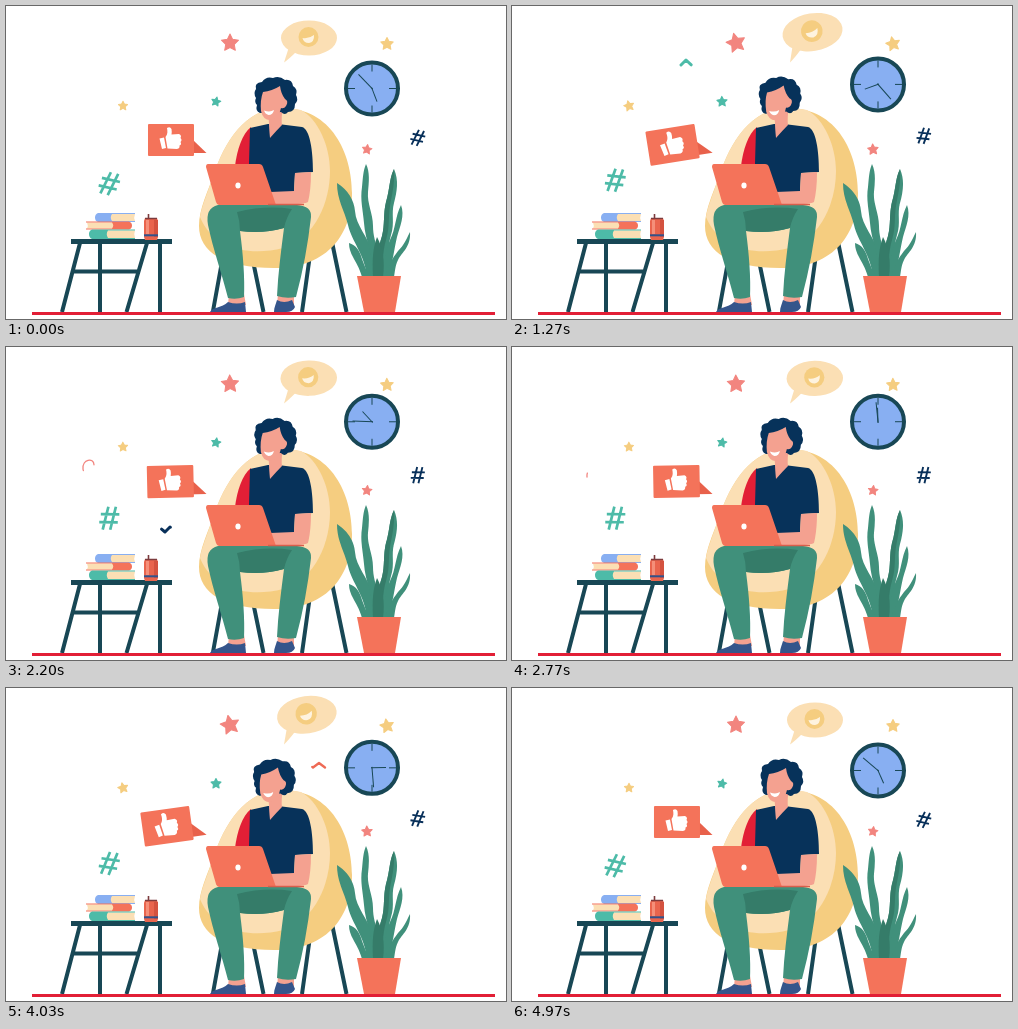
These frames come from a looping animation (500x313 px, 5010 ms). An HTML page:

```html
<!DOCTYPE html>
<html lang="en">
<head>
<meta charset="utf-8">
<title>Working from home</title>
<style>
  html, body { margin: 0; width: 100%; height: 100%; overflow: hidden; background: #fff; }
  svg { display: block; width: 100vw; height: 100vh; }
  .dark { stroke: #184755; fill: none; }
  .navy { fill: #07325a; }
  .coral { fill: #f4735a; }
  .skin { fill: #f4a190; }
  .green { fill: #40907b; }
  .deep { fill: #357c69; }
  .cream { fill: #fbdfb4; }
  .gold { fill: #f5cd80; }
  .teal { fill: #4dbba8; }
  .blue { fill: #88aff2; }
  .trail { fill: none; stroke-linecap: round; stroke-linejoin: round; }
</style>
</head>
<body>
<svg viewBox="0 0 500 313" preserveAspectRatio="none">
  <!-- table -->
  <g class="dark" stroke-width="4">
    <path d="M74 237L56 306M94 237V306M141 237L120.500 306M154 237V306M66 265.5H132"/>
    <path d="M65 235.5H166" stroke-width="5"/>
  </g>

  <!-- books and can -->
  <path class="cream" d="M103 208H129Q127.500 211.500 129 215H103Z"/>
  <path class="blue" d="M129 207H92Q89 208 89 211.500T92 216H129V215H106Q103.500 211.500 106 208H129Z"/>
  <path class="cream" d="M81 216.500H109V222.500H81Q82.500 219.500 81 216.500Z"/>
  <path class="coral" d="M80 215.500H123Q126 216.500 126 219.500T123 223.500H80V222.500H106Q108.500 219.500 106 216.500H80Z"/>
  <path class="cream" d="M100 224.500H129Q127.500 228 129 232H100Z"/>
  <path class="teal" d="M129 223.500H86Q83 224.500 83 228T86 233H129V232H102Q99.500 228 102 224.500H129Z"/>
  <path d="M139 212H151L152 215V231L151 234H139L138 231V215Z" fill="#e9644d"/>
  <path d="M140 214H143V228H140Z" fill="#f58f79"/>
  <path d="M148 214H152V231H148Z" fill="#d4523f"/>
  <path d="M138 229.300H152" stroke="#31528c" stroke-width="2"/>
  <path d="M139 212.500H151M142.500 208V212" stroke="#7c3b3d" stroke-width="1.600"/>

  <!-- chair -->
  <path class="dark" stroke-width="4" d="M217 250L207 305M247 255L257.500 306M305.500 238L296 306M326 236L340.500 306"/>
  <path class="gold" d="M193 220C193 203 202 185 208 168C218 138 238 102 276 102C326 102 346 148 346 187C346 226 324 262 268 262C218 262 193 246 193 220Z"/>
  <path class="cream" d="M194 211C196 199 203 183 208 168C218 138 238 102 276 102Q286 102 295 104C312 113 324 140 324 165C324 195 310 232 277 242C246 250 208 245 194 211Z"/>

  <!-- plant -->
  <path class="green" d="M331 177C342 184 348 194 349 205C350 220 362 230 366 246L371 271H361C359 249 346 236 342 219C338 203 331 194 331 177Z"/>
  <path class="green" d="M360 158C364 166 363 176 362 186C361 198 367 207 367 220C367 238 377 250 374 271H366C368 250 359 234 358 217C357 204 354 194 356 181C357 172 357 165 360 158Z"/>
  <path class="green" d="M388 163C393 174 391 186 388 197C385 208 389 217 385 229C381 242 383 256 378 271H370C372 254 372 242 376 230C379 219 377 208 380 196C384 183 383 173 388 163Z"/>
  <path class="deep" d="M388 163C389 178 386 188 384 200C382 213 384 221 380 234C376 247 378 258 373 271H368C370 254 372 242 376 230C379 219 377 208 380 196C384 183 383 173 388 163Z"/>
  <path class="green" d="M395 199C399 210 394 220 391 231C388 243 387 258 381 271H374C378 257 379 246 384 234C390 222 389 211 395 199Z"/>
  <path class="deep" d="M367 271C366 252 367 242 371 231C377 242 379 255 377 271Z"/>
  <path class="green" d="M404 226C405 241 396 246 392 254C389 260 389 266 388 271H379C383 258 386 253 392 245C398 239 400 234 404 226Z"/>
  <path class="green" d="M343 237C350 239 354 245 356 253Q359 262 364 271H356C353 261 350 257 347 251Q343 244 343 237Z"/>
  <path class="coral" d="M351 270H395L389 306H358Z"/>

  <!-- legs and shoes -->
  <path class="skin" d="M223 288H238L240 299H222ZM272 288H288V299H271Z"/>
  <path d="M204 306C206 301 216 302 222 296Q231 299 239 296L240 306Z" fill="#35558b"/>
  <path d="M268 306C268 301 270 298 271 294Q278 298 286 294L289 301Q287 306 280 306Z" fill="#35558b"/>
  <path class="green" d="M212 199H291Q306 200 305 211C302 238 297 265 290 291Q280 293 271 290C272 268 275 245 278 222Q257 228 234 225C237 248 239 272 238 291Q230 294 222 292C216 268 207 243 202 219Q199 202 212 199Z"/>
  <path class="deep" d="M231 206Q259 199 286 203Q280 212 278 222Q257 228 234 225Q234 215 231 206Z"/>

  <!-- torso, arms, laptop -->
  <path d="M245 121C236 128 231 144 229 160H247Z" fill="#e21f36"/>
  <path class="navy" d="M244 122L262 118H272L296 121C304 123 307 145 307 166L289 167L288 186H246L243 158Z"/>
  <path class="skin" d="M289 167L305 166Q305 184 302 196Q298 199 265 198L264 186L288 185Z"/>
  <path class="coral" d="M202 158H253Q256 158 257 161L270 199H213Q211 199 210 196L200 161Q200 158 202 158Z"/>
  <path d="M262 198.500H298" stroke="#d95e4c" stroke-width="1.500"/>
  <ellipse cx="232" cy="179.500" rx="2.600" ry="3" fill="#fff"/>

  <!-- floor -->
  <path d="M26 307.500H489" stroke="#e21f36" stroke-width="3"/>

  <!-- head -->
  <path class="skin" d="M262 106L277 100Q275 113 276 119Q270 125 264 132Q263 122 263 117Z"/>
  <g id="head">
    <path class="navy" d="M250 92Q247 87 250 83Q248 77 256 76Q260 70 267 72Q273 69 279 74Q286 73 287 80Q292 83 290 89Q293 94 289 98Q289 106 282 106Q279 110 275 106L254 107Q249 105 251 99Q248 96 250 92Z"/>
    <path class="skin" d="M257 86Q266 85 274 80Q275 88 279 93Q283 95 280 100Q278 103 275 102Q273 113 264 114Q257 114 255 105Q254 94 257 86Z"/>
    <path d="M258 104.500Q264 106.500 268 104Q267 109 262.500 109Q259 108 258 104.500Z" fill="#fff"/>
  </g>

  <!-- speech bubbles -->
  <g id="like">
    <path d="M184 134H187L200.500 147H181Z" fill="#e8614b"/>
    <rect class="coral" x="142" y="118" width="46" height="32" rx="1"/>
    <path d="M153.500 132.500L158 131.500L160 142L156 143ZM159.500 131C162 128 161.500 125 161 122Q164 120 165.500 123Q166 126 165.500 128.500L173 128Q176 129.500 174.500 132Q176.500 134 174.500 136Q176 138.500 173.500 139.500Q174 142.500 171 143L161.500 142.500Z" fill="#fff"/>
  </g>
  <g id="smile">
    <path class="cream" d="M283 41L278 56.500Q283 53 290 46Z"/>
    <ellipse class="cream" cx="303" cy="32" rx="28" ry="17.500"/>
    <circle class="gold" cx="302.500" cy="31" r="10"/>
    <path d="M296.500 32Q303 33 308 29Q308.500 36 303 37Q297.500 37 296.500 32Z" fill="#fef3df"/>
  </g>

  <!-- clock -->
  <g id="clock">
    <circle class="blue" r="26" stroke="#184755" stroke-width="4"/>
    <path class="dark" stroke-width="1" d="M0 -24V-17M0 24V17M-24 0H-17M24 0H17"/>
    <path id="minute" class="dark" stroke-width="1" d="M0 1V-19.500"/>
    <path id="hour" class="dark" stroke-width="1" d="M0 1V-14"/>
  </g>

  <g id="stars"></g>
  <g id="hashes"></g>
  <g id="trails"></g>
</svg>
<script>
const LOOP = 5010;
const byId = id => document.getElementById(id);

function add(parent, tag, attrs) {
  const el = document.createElementNS("http://www.w3.org/2000/svg", tag);
  for (const key in attrs) el.setAttribute(key, attrs[key]);
  return byId(parent).appendChild(el);
}

function starPath(r) {
  const points = [];
  for (let i = 0; i < 10; i++) {
    const a = i * Math.PI / 5 - Math.PI / 2;
    const d = i % 2 ? r * 0.5 : r;
    points.push((d * Math.cos(a)).toFixed(2) + " " + (d * Math.sin(a)).toFixed(2));
  }
  return "M" + points.join("L") + "Z";
}

// x, y, radius, colour, resting angle, swing
const stars = [
  [224, 37, 9, "#f2857f", 0, -14],
  [381, 38, 6.6, "#f5cd80", 0, -12],
  [117, 100, 4.8, "#f5cd80", 0, -14],
  [210, 95.7, 4.8, "#4dbba8", 12, -14],
  [361, 143.5, 5, "#f2857f", 8, -12]
].map(([x, y, r, color, angle, swing]) => ({
  x, y, angle, swing,
  el: add("stars", "path", { d: starPath(r), fill: color, stroke: color, "stroke-width": 1, "stroke-linejoin": "round" })
}));

// x, y, size, colour, rise
const hashes = [
  [103.3, 177.7, 1, "#4dbba8", 6.7],
  [411.8, 131.8, 0.7, "#08305a", 3.8]
].map(([x, y, size, color, rise]) => ({
  x, y, size, rise,
  el: add("hashes", "path", { d: "M-1 -11.500L-6.500 11.500M6.500 -11.500L1 11.500M-8.500 -4H10M-10 4H8.500", fill: "none", stroke: color, "stroke-width": 2.7 })
}));

// start time, colour, width, path
const trails = [
  [750, "#4dbba8", 3, "M180.500 60L174 54L169 59L165 53.500L158.500 58"],
  [1630, "#f2857f", 1.3, "M82 127Q77.500 126 77 122C76 112 88 110 88 118C88 126 74 118 75 130"],
  [1560, "#08305a", 3, "M170 183.500L164 180L159 185L153 180L148 185"],
  [3330, "#ee6a55", 2.3, "M328.500 79.500L325 75.500L319 79.500L313 75L307 79.500L301 75L297 79"]
].map(([start, color, width, d]) => ({
  start,
  el: add("trails", "path", { class: "trail", d, stroke: color, "stroke-width": width, pathLength: 100 })
}));

const place = (el, transform) => el.setAttribute("transform", transform);
const wave = u => (1 - Math.cos(u * 2 * Math.PI)) / 2;

function tilt(id, x, y, angle, scale) {
  place(byId(id), `translate(${x} ${y}) rotate(${angle}) scale(${scale}) translate(${-x} ${-y})`);
}

function drawTrail({ start, el }, t) {
  const u = (t - start) / 1200;
  const visible = u > 0 && u < 1;
  el.style.display = visible ? "" : "none";
  if (!visible) return;
  const head = Math.min(1, u * 1.2) * 100;
  const tail = Math.max(0, (u - 0.4) / 0.6) * 100;
  el.setAttribute("stroke-dasharray", `${head - tail} 300`);
  el.setAttribute("stroke-dashoffset", -tail);
}

function draw(t) {
  const u = t / LOOP;
  const sway = wave(u * 2);
  const lift = wave(u);

  tilt("like", 199, 147, -9 * sway, 1 + 0.08 * sway);
  tilt("smile", 278, 56.5, -9 * sway, 1 + 0.08 * sway);
  tilt("head", 266, 118, -3.5 * sway, 1);

  place(byId("clock"), `translate(366 ${82.5 - 8 * lift})`);
  place(byId("minute"), `rotate(${316 + 720 * u})`);
  place(byId("hour"), `rotate(${159 + 360 * u})`);

  for (const s of stars)
    place(s.el, `translate(${s.x} ${s.y}) rotate(${s.angle + s.swing * sway}) scale(${1 + 0.1 * sway})`);
  for (const h of hashes)
    place(h.el, `translate(${h.x} ${h.y - h.rise * lift}) rotate(${13 * (1 - lift)}) scale(${h.size})`);
  for (const trail of trails) drawTrail(trail, t);
}

const began = performance.now();
function tick() {
  draw((performance.now() - began) % LOOP);
  requestAnimationFrame(tick);
}
tick();
</script>
</body>
</html>
```
